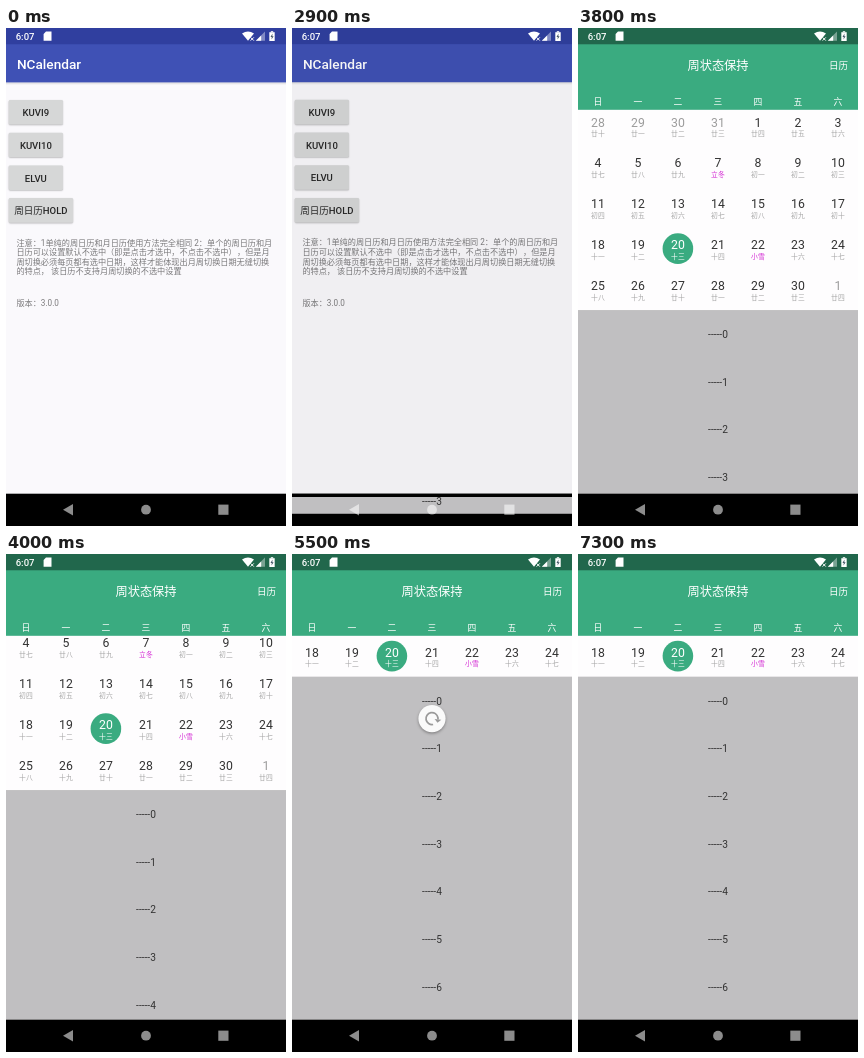
Animation, 280 px wide and 498 px high, one loop 8 s. Source, as an HTML page with a canvas:

```html
<!DOCTYPE html>
<html lang="zh-CN">
<head>
<meta charset="utf-8">
<title>NCalendar</title>
<style>
html, body { margin: 0; width: 100%; height: 100%; overflow: hidden; background: #000; }
canvas { display: block; width: 280px; height: 498px; }
</style>
</head>
<body>
<canvas id="stage"></canvas>
<script>
const W = 280, H = 498, LOOP = 8000, STEP = 100;
const NAV_TOP = 465.7, CAL_TOP = 81.8, ROW = 40.85, ITEM = 47.69;
const FONT = 'Roboto, "Noto Sans CJK SC", "Noto Sans CJK", sans-serif';
const canvas = document.getElementById('stage');
const ctx = canvas.getContext('2d');
const dpr = window.devicePixelRatio || 1;
canvas.width = W * dpr;
canvas.height = H * dpr;

const clamp = v => Math.max(0, Math.min(1, v));
const span = (t, a, b) => clamp((t - a) / (b - a));

function bezier(x, x1, y1, x2, y2) {
  const at = (s, a, b) => 3 * s * (1 - s) * (1 - s) * a + 3 * s * s * (1 - s) * b + s * s * s;
  let lo = 0, hi = 1;
  for (let i = 0; i < 24; i++) {
    const mid = (lo + hi) / 2;
    if (at(mid, x1, x2) < x) lo = mid; else hi = mid;
  }
  return at(hi, y1, y2);
}
const fastSlow = p => p <= 0 ? 0 : p >= 1 ? 1 : bezier(p, 0.4, 0, 0.2, 1);
function extraSlow(p) {
  if (p <= 0) return 0;
  if (p >= 1) return 1;
  const k = 1 / 6;
  return p < k ? 0.4 * bezier(p / k, 0.3, 0, 0.8, 0.15)
               : 0.4 + 0.6 * bezier((p - k) / (1 - k), 0.05, 0.7, 0.1, 1);
}

// Linear interpolation through [time, value] points
function track(t, pts) {
  if (t <= pts[0][0]) return pts[0][1];
  for (let i = 1; i < pts.length; i++) {
    const [a, va] = pts[i - 1], [b, vb] = pts[i];
    if (t <= b) return va + (vb - va) * (t - a) / (b - a);
  }
  return pts[pts.length - 1][1];
}

function rect(x, y, w, h, color) {
  ctx.fillStyle = color;
  ctx.fillRect(x, y, w, h);
}
function disc(x, y, r, color) {
  ctx.fillStyle = color;
  ctx.beginPath();
  ctx.arc(x, y, r, 0, Math.PI * 2);
  ctx.fill();
}
function poly(color, ...pts) {
  ctx.fillStyle = color;
  ctx.beginPath();
  pts.forEach(([x, y]) => ctx.lineTo(x, y));
  ctx.closePath();
  ctx.fill();
}
// y is the middle of the capitals
function text(str, x, y, size, color, align = 'left', weight = 400) {
  ctx.font = `${weight} ${size}px ${FONT}`;
  ctx.textAlign = align;
  ctx.fillStyle = color;
  ctx.fillText(str, x, y + size * 0.36);
}

function statusIcons() {
  text('6:07', 9.7, 8.5, 9.54, '#fff', 'left', 500);
  poly('#fff', [40, 3.5], [45.5, 3.5], [45.5, 12.8], [37.6, 12.8], [37.6, 6]);
  ctx.fillStyle = '#fff';
  ctx.beginPath();
  ctx.moveTo(242, 12.8);
  ctx.lineTo(236, 5.6);
  ctx.quadraticCurveTo(242, 1.6, 248, 5.6);
  ctx.closePath();
  ctx.fill();
  ctx.lineWidth = 1;
  ctx.strokeStyle = '#fff';
  ctx.beginPath();
  ctx.moveTo(244.6, 9.4); ctx.lineTo(247.8, 12.6);
  ctx.moveTo(247.8, 9.4); ctx.lineTo(244.6, 12.6);
  ctx.stroke();
  poly('rgba(255,255,255,.4)', [259, 3.6], [259, 12.8], [249.8, 12.8]);
  poly('#fff', [255.2, 7.4], [255.2, 12.8], [249.8, 12.8]);
  rect(263.3, 4.2, 5.4, 8.8, '#fff');
  rect(264.8, 3.2, 2.4, 1, '#fff');
  poly('#456', [266.5, 5.6], [264.5, 9], [265.8, 9], [265.5, 11.6], [267.6, 8.2], [266.3, 8.2]);
}

function navIcons() {
  const c = 'rgba(255,255,255,.55)';
  poly(c, [57, 481.7], [67, 476], [67, 487.4]);
  disc(140, 481.7, 4.9, c);
  rect(212.3, 476.6, 10.2, 10.2, c);
}

const BUTTONS = [['KUVI9', 54.3], ['KUVI10', 54.3], ['ELVU', 54.3], ['周日历HOLD', 64.4]];
const NOTE = [
  [10.4, 0, '注意：1单纯的周日历和月日历使用方法完全相同 2：单个的周日历和月'],
  [10.4, 1, '日历可以设置默认不选中（即是点击才选中，不点击不选中）'],
  [231, 1, '，但是月'],
  [10.4, 2, '周切换必须每页都有选中日期，这样才能体现出月周切换日期无缝切换'],
  [10.4, 3, '的特点， 该日历不支持月周切换的不选中设置'],
  [10.4, 6.3, '版本：3.0.0']
];

function button(label, w, i, press) {
  const y = 72 + i * 32.7;
  ctx.save();
  ctx.shadowColor = 'rgba(0,0,0,.25)';
  ctx.shadowBlur = 1.5 * dpr;
  ctx.shadowOffsetY = 0.7 * dpr;
  ctx.fillStyle = '#d6d7d7';
  ctx.beginPath();
  ctx.roundRect(2.7, y, w, 24.6, 1.4);
  ctx.fill();
  ctx.restore();
  if (press) {
    ctx.fillStyle = `rgba(0,0,0,${press})`;
    ctx.fill();
  }
  text(label, 2.7 + w / 2, y + 12.7, 9.54, '#262626', 'center', 500);
}

function menuScreen(t) {
  rect(0, 0, W, H, '#faf9fc');
  rect(0, 54.4, W, 1, 'rgba(0,0,0,.14)');
  rect(0, 55.4, W, 1.2, 'rgba(0,0,0,.05)');
  rect(0, 0, W, 54.4, '#3f51b5');
  rect(0, 0, W, 16.3, '#303f9f');
  text('NCalendar', 10.9, 36, 13.63, '#fff', 'left', 500);
  const press = track(t, [[2000, 0], [2100, 0.07], [2200, 0.13], [2300, 0.13], [2400, 0]]);
  BUTTONS.forEach(([label, w], i) => button(label, w, i, i === 3 ? press : 0));
  NOTE.forEach(([x, line, str]) => text(str, x, 214.7 + line * 9.6, 8.17, '#7b7a7c'));
  rect(0, NAV_TOP, W, H, '#000');
}

const DIGITS = '十一二三四五六七八九';
function lunar(i) {
  const d = (19 + i) % 30 + 1;
  return (d <= 10 ? '初' : d < 20 ? '十' : d < 30 ? '廿' : '三') + DIGITS[d % 10];
}
const TERMS = { 10: '立冬', 25: '小雪' };
const SELECTED = 23;

function dayCell(i, shift) {
  const x = 19.9 + (i % 7) * 40;
  const y = CAL_TOP + Math.floor(i / 7) * ROW - shift;
  const day = i < 4 ? 28 + i : i === 34 ? 1 : i - 3;
  const on = i === SELECTED, dim = i < 4 || i === 34;
  if (on) disc(x, y + 20.3, 15.3, '#3aab80');
  text(String(day), x, y + 16.3, 12.26, on ? '#fff' : dim ? '#9c9c9c' : '#333', 'center');
  text(TERMS[i] || lunar(i), x, y + 28, 6.81,
       on ? '#fff' : TERMS[i] ? '#d32bd3' : '#a5a5a5', 'center');
}

function spinner(t) {
  if (t < 5200 || t >= 7300) return;
  const y = track(t, [[5200, 106], [5300, 127], [5400, 147], [5500, 164.6], [5600, 179],
    [5700, 190], [5800, 196], [5900, 170], [6000, 155], [6100, 152.6]]);
  const busy = t >= 6000;
  const scale = 1 - span(t, 7000, 7270);
  if (scale <= 0) return;
  ctx.save();
  ctx.translate(140, y);
  ctx.scale(scale, scale);
  ctx.save();
  ctx.shadowColor = 'rgba(0,0,0,.35)';
  ctx.shadowBlur = 3 * dpr;
  ctx.shadowOffsetY = 1.2 * dpr;
  disc(0, 0, 13.6, '#fafafa');
  ctx.restore();

  const color = busy ? '#222' : t < 5650 ? '#9a9a9a' : '#333';
  const turn = Math.PI * 2;
  let from, to;
  if (busy) {
    const u = (t - 6000) / 1332, f = u % 1;
    const spin = u * 0.55 - 0.25;
    from = spin + 0.75 * fastSlow(clamp(f * 2 - 1));
    to = spin + 0.05 + 0.75 * fastSlow(clamp(f * 2));
  } else {
    to = 0.02 + (y - 164.6) / 160;
    from = to - 0.8;
  }
  ctx.strokeStyle = color;
  ctx.lineWidth = 1.75;
  ctx.beginPath();
  ctx.arc(0, 0, 6, from * turn, to * turn);
  ctx.stroke();
  if (!busy) {
    ctx.rotate(to * turn);
    poly(color, [2.6, 0], [9.4, 0], [6, 3.5]);
  }
  ctx.restore();
}

function calendarScreen(t) {
  const lift = track(t, [[3700, 0], [3800, 4], [3900, 22], [4000, 50], [4100, 84],
    [4200, 120], [4300, 149.2], [4400, ROW * 4]]);
  const scroll = track(t, [[4500, 0], [4600, 12], [4700, 21], [4800, 24], [4900, 24],
    [5000, 17], [5100, 7], [5200, 0]]);
  const shift = Math.min(lift, ROW * 3);
  const top = CAL_TOP + ROW * 5 - lift;

  rect(0, 0, W, H, '#fefdfe');
  for (let i = 0; i < 35; i++) dayCell(i, shift);

  rect(0, top, W, H - top, '#c0bfc1');
  ctx.save();
  ctx.beginPath();
  ctx.rect(0, top, W, NAV_TOP - top);
  ctx.clip();
  for (let i = 0; i < 9; i++) {
    text('-----' + i, 140, top + 24.2 + i * ITEM - scroll, 10.2, '#333', 'center');
  }
  spinner(t);
  ctx.restore();

  rect(0, 0, W, CAL_TOP, '#3aab80');
  rect(0, 0, W, 16.3, '#21674c');
  text('周状态保持', 140, 37.6, 12.26, '#fff', 'center');
  text('日历', 270, 37.5, 9.54, '#fff', 'right');
  [...'日一二三四五六'].forEach((c, i) => text(c, 19.9 + i * 40, 73.6, 8.8, '#fff', 'center'));
  rect(0, NAV_TOP, W, H, '#000');
}

function draw(t) {
  ctx.setTransform(dpr, 0, 0, dpr, 0, 0);
  rect(0, 0, W, H, '#000');
  const p = span(t, 2857, 3387);
  const slide = fastSlow(p);
  if (p < 1) {
    ctx.save();
    ctx.translate(0, -10 * slide);
    menuScreen(t);
    rect(0, 0, W, H, `rgba(0,0,0,${0.1 * clamp(p / 0.2)})`);
    ctx.restore();
  }
  if (p > 0) {
    ctx.save();
    ctx.beginPath();
    ctx.rect(0, H * (1 - extraSlow(p)), W, H);
    ctx.clip();
    ctx.translate(0, 20.4 * (1 - slide));
    calendarScreen(t);
    ctx.restore();
  }
  statusIcons();
  navIcons();
}

const start = performance.now();
function tick() {
  const t = (performance.now() - start) % LOOP;
  draw(Math.floor(t / STEP) * STEP);
  requestAnimationFrame(tick);
}
tick();
</script>
</body>
</html>
```
